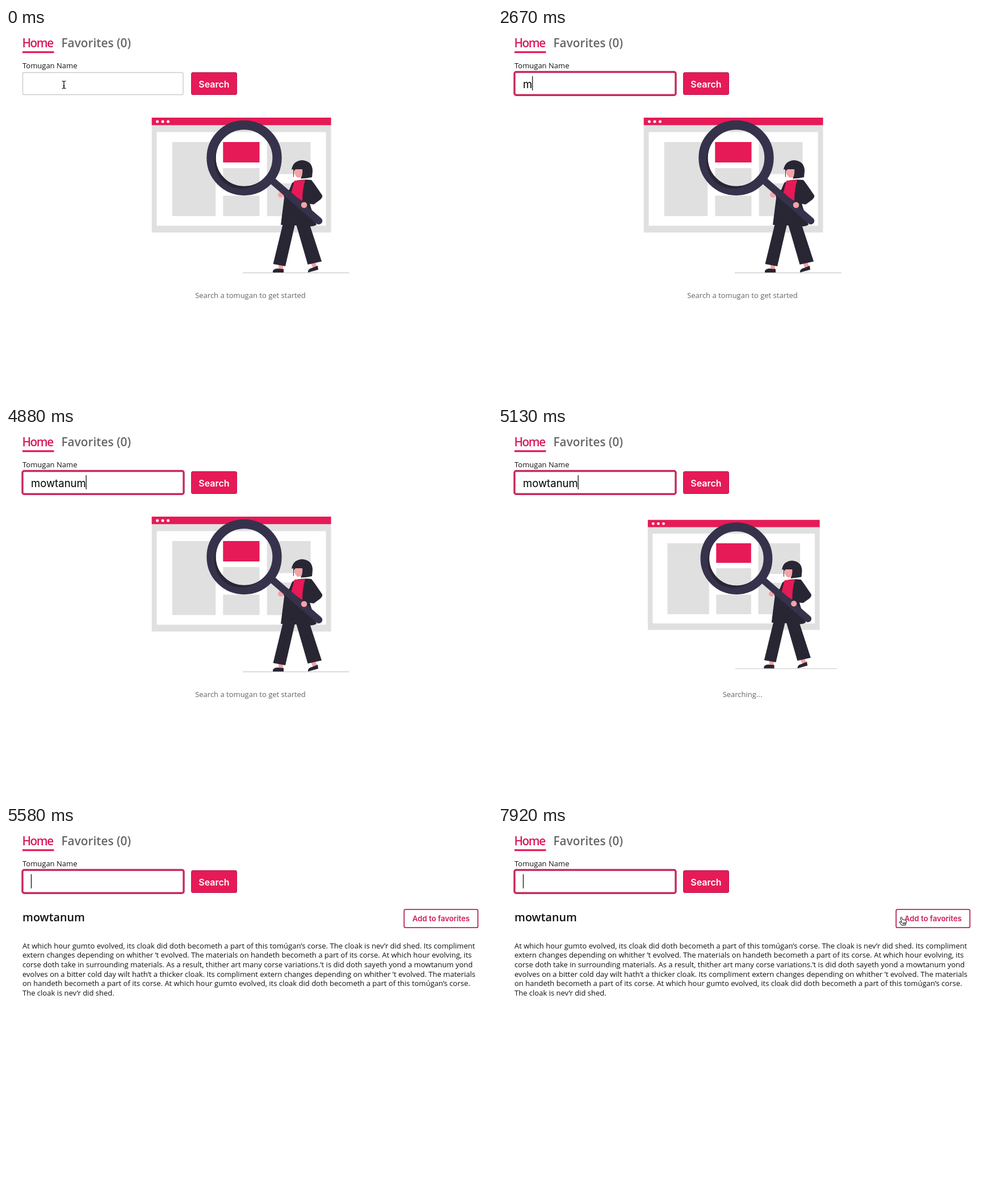
These frames come from a looping animation (856 px wide and 654 px high, 8000 ms). An HTML page:

```html
<!DOCTYPE html>
<html lang="en">
<head>
<meta charset="utf-8">
<title>Creature search</title>
<style>
  html, body { margin: 0; width: 100%; height: 100%; overflow: hidden; background: #fff; }
  svg { display: block; width: 856px; height: 654px; }
  text { font-family: "Open Sans", "Noto Sans", sans-serif; font-size: 13.02px; fill: #111; white-space: pre; }
  .nav { font-size: 20.8px; font-weight: 600; }
  .ui { font-family: Inter, Roboto, sans-serif; font-weight: 600; text-anchor: middle; }
  .note { text-anchor: middle; fill: #666; }
  .pink { fill: #e61a57; }
  .grey { fill: #e0e0e0; }
  .dark { fill: #292634; }
  .skin { fill: #f3a3a6; }
</style>
</head>
<body>
<svg viewBox="0 0 856 654">
  <text class="nav" x="28.500" y="34" style="fill:#d81b58;letter-spacing:-1.500px">Home</text>
  <rect class="pink" x="29" y="41" width="55.500" height="3.200"/>
  <text class="nav" x="97.500" y="34" style="fill:#666">Favorites (0)</text>
  <text x="29" y="71">Tomugan Name</text>
  <rect id="field" fill="#fff"/>
  <text id="typed" x="44" y="105.500" style="font:18.5px Inter,Roboto,sans-serif;fill:#000"></text>
  <path id="caret" stroke="#000" stroke-width="1.200"/>
  <rect class="pink" x="326.500" y="78.500" width="80" height="39" rx="2.500" stroke="#b81c4c"/>
  <text class="ui" x="366.400" y="104.800" style="font-size:16px;fill:#fff">Search</text>

  <g id="start">
    <g id="art">
      <path class="grey" d="M256.700 158h315.800v202.500h-315.800z"/>
      <path class="pink" d="M256.700 158h315.800v13.300h-315.800z"/>
      <path fill="#fff" d="M265.500 183.500h298v165h-298z"/>
      <g fill="#fff"><circle cx="266.500" cy="165" r="2.500"/><circle cx="276" cy="165" r="2.500"/><circle cx="285.500" cy="165" r="2.500"/></g>
      <path class="grey" d="M292.700 201h76.600v130.500h-76.600zM382.300 247h64.200v36h-64.200zM382.300 295.500h64.200v36h-64.200zM459.700 201h76.800v56.500h-76.800zM459.700 274h76.800v57.500h-76.800z"/>
      <path class="pink" d="M382.300 201h64.200v36h-64.200z"/>
      <path d="M417 431.500H604.500" stroke="#d0d0d0" stroke-width="1.500"/>
      <path class="skin" d="M480 417h8v9h-8zM537 415l8-2 3 8-7 3z"/>
      <path class="dark" d="M470 431Q469 425 477 424L489 425V431zM532 431Q531 425 539 423L549 419 550 426z"/>
      <path class="dark" d="M488 344L509 346 492 420 470.500 416zM511 346L534 344 556 411.500 531.500 417z"/>
      <circle class="skin" cx="484" cy="294" r="5"/>
      <path class="dark" d="M511 269Q526 266 538 268L544 276 557 295Q558 299 553 303L542 311 535 310 547 347Q540 351 532 349L484 347 490 299 488 291 499 285 504 273z"/>
      <path class="pink" d="M508 269L527 268Q522 284 522 305L502 292Z"/>
      <path class="skin" d="M507 247H524L520 263 514 264Q507 260 507 247z"/>
      <path class="dark" d="M503 250Q505 234 522 233 540 235 540 252L539 263Q530 265 519 265.500 523 258 522 249L510 249 507 252V263L506 262V249z"/>
      <path d="M470 270L551 340" stroke="#37324b" stroke-width="12.500" stroke-linecap="round"/>
      <circle class="skin" cx="525" cy="312" r="5.300"/>
      <circle cx="419.500" cy="229" r="58" fill="none" stroke="#37324b" stroke-width="16.300"/>
      <path class="dark" d="M380 198A50 50 0 0 0 459 260A50 56 38 0 1 380 198z"/>
    </g>
    <text class="note" id="note" x="430.500" y="476"></text>
  </g>

  <g id="result">
    <text x="29" y="168" style="font-size:19.8px;font-weight:600">mowtanum</text>
    <rect x="701.200" y="147.200" width="130" height="32" rx="2.500" fill="#fff" stroke="#b8265a" stroke-width="1.800"/>
    <text class="ui" x="766.300" y="168" style="font-size:13.2px;fill:#d01c56">Add to favorites</text>
    <g id="story"></g>
  </g>

  <g id="pointer" stroke-linejoin="round" stroke-linecap="round">
    <g id="beam" fill="none">
      <path d="M-3-6.500Q0-6.500 0-4.500 0-6.500 3-6.500M0-5V5M-3 6.500Q0 6.500 0 4.500 0 6.500 3 6.500" stroke="#fff" stroke-width="2.500"/>
      <path d="M-3-6.500Q0-6.500 0-4.500 0-6.500 3-6.500M0-5V5M-3 6.500Q0 6.500 0 4.500 0 6.500 3 6.500M-1.500 2H1.500" stroke="#000" stroke-width="1.200"/>
    </g>
    <path id="arrow" d="M0 0V13L3 10.200 5 15 7.300 14 5.300 9.500H9.500z" stroke="#fff"/>
    <path id="hand" d="M-3-5.500Q-2-8-.700-5.500L1-1.500Q2.500-3 3.500-1.200 5-2.200 5.700-.500 7.200-.800 7.300 1L6.800 4.500 5.500 8H-1L-5 2.800Q-5 .800-3 2L-1.200 3zM1.300 3.500V6M3.200 3.200V6M5 3V5.500" fill="#fff" stroke="#000"/>
  </g>
</svg>
<script>
const LOOP = 8000, FOCUS = 1240, SEARCH = 5000, FOUND = 5460, BLINK = 540;
const WORD = 'mowtanum';
const KEYS = [2560, 2700, 2830, 2980, 3110, 3750, 4050, 4690];
const STORY = [
  'At which hour gumto evolved, its cloak did doth becometh a part of this tomúgan’s corse. The cloak is nev’r did shed. Its compliment',
  'extern changes depending on whither ’t evolved. The materials on handeth becometh a part of its corse. At which hour evolving, its',
  'corse doth take in surrounding materials. As a result, thither art many corse variations.’t is did doth sayeth yond a mowtanum yond',
  'evolves on a bitter cold day wilt hath’t a thicker cloak. Its compliment extern changes depending on whither ’t evolved. The materials',
  'on handeth becometh a part of its corse. At which hour gumto evolved, its cloak did doth becometh a part of this tomúgan’s corse.',
  'The cloak is nev’r did shed.'
];
// Pointer stops: time, x, y
const PATH = [[40, 102, 100], [800, 105, 94], [6920, 105, 94], [7670, 719, 168], [7750, 719, 168], [7920, 712, 167]];

const $ = id => document.getElementById(id);
const set = (el, attrs) => { for (const k in attrs) el.setAttribute(k, attrs[k]); };
const show = (id, on) => $(id).style.display = on ? '' : 'none';
const ease = u => (1 - Math.cos(Math.PI * Math.min(1, Math.max(0, u)))) / 2;

STORY.forEach((line, i) => {
  const row = document.createElementNS('http://www.w3.org/2000/svg', 'text');
  set(row, { x: 29, y: 215.6 + i * 16.72 });
  row.textContent = line;
  $('story').append(row);
});

function pointerAt(t) {
  let [, x, y] = PATH[0];
  for (let i = 1; i < PATH.length; i++) {
    const [t0, x0, y0] = PATH[i - 1], [t1, x1, y1] = PATH[i];
    if (t < t0) break;
    const u = ease((t - t0) / (t1 - t0));
    x = x0 + (x1 - x0) * u;
    y = y0 + (y1 - y0) * u;
  }
  return [x, y];
}

function drawField(t) {
  const focus = t >= FOCUS, found = t >= FOUND;
  set($('field'), focus
    ? { x: 29, y: 77.5, width: 284, height: 40.7, rx: 3, stroke: '#c8285a', 'stroke-width': 3.4 }
    : { x: 29.5, y: 78.5, width: 282.5, height: 39, rx: 2.5, stroke: '#ccc', 'stroke-width': 1.4 });
  const count = found ? 0 : KEYS.filter(k => k <= t).length;
  $('typed').textContent = WORD.slice(0, count);
  const since = found ? 5250 : count ? KEYS[count - 1] : FOCUS;
  show('caret', focus && Math.floor((t - since) / BLINK) % 2 === 0);
  const x = 44.5 + (count ? $('typed').getComputedTextLength() : 0);
  set($('caret'), { d: `M${x} 85V110` });
}

function drawPage(t) {
  show('start', t < FOUND);
  show('result', t >= FOUND);
  $('note').textContent = t < SEARCH ? 'Search a tomugan to get started' : 'Searching...';
  const s = t < SEARCH ? 1 : 0.95 + 0.05 * ease((t - SEARCH) / 480);
  set($('art'), { transform: `translate(430.5 295) scale(${s}) translate(-430.5 -295)` });
}

function drawPointer(t) {
  const [x, y] = pointerAt(t);
  const beam = x < 313 && y < 119, hand = x > 701 && y > 147;
  show('pointer', t < KEYS[0] || t >= 6920);
  show('beam', beam);
  show('hand', hand);
  show('arrow', !beam && !hand);
  set($('pointer'), { transform: `translate(${x} ${y})` });
}

function frame(now) {
  const t = now % LOOP;
  drawField(t);
  drawPage(t);
  drawPointer(t);
  requestAnimationFrame(frame);
}
requestAnimationFrame(frame);
</script>
</body>
</html>
```
